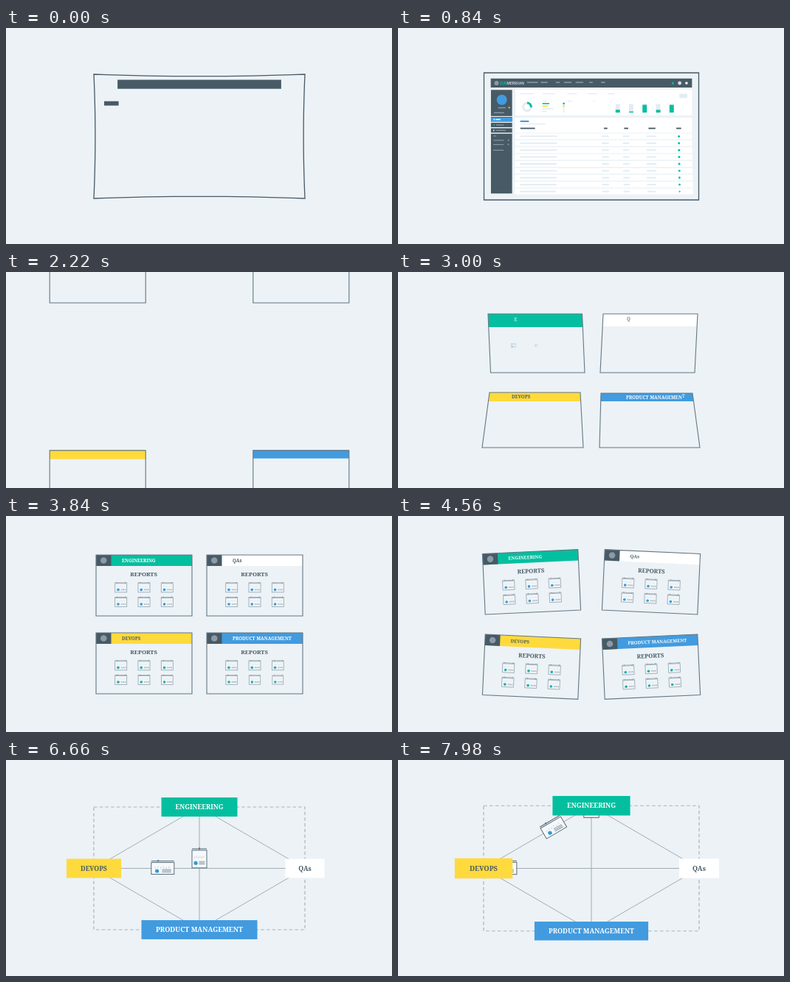
Write an HTML page with a canvas that moves like this. It is 523 px wide and 294 px high and loops after 8000 ms.

```html
<!DOCTYPE html>
<html lang="en">
<head>
<meta charset="utf-8">
<title>Reports for every team</title>
<style>
  html, body { margin: 0; width: 100%; height: 100%; overflow: hidden; background: #ecf2f6; }
  canvas { display: block; width: 100%; height: 100%; }
</style>
</head>
<body>
<canvas id="stage"></canvas>
<script>
const W = 523, H = 294, LOOP = 8000, STEP = 60, CX = 262, CY = 147.5;
const BG = '#ecf2f6', DARK = '#475a66', GREEN = '#04bf9f', YELLOW = '#ffda3d',
      BLUE = '#429bdf', PALE = '#e3ecf2', WHITE = '#ffffff', GREY = '#9aa6ae';
const canvas = document.getElementById('stage'), ctx = canvas.getContext('2d');

const lerp = (a, b, u) => a + (b - a) * u;
const clamp = u => Math.max(0, Math.min(1, u));
const seg = (t, from, to) => clamp((t - from) / (to - from));
const smooth = u => (1 - Math.cos(Math.PI * u)) / 2;
const easeOut = u => 1 - (1 - u) ** 3;
const ramp = (t, from, to) => smooth(seg(t, from, to));
const serif = size => `700 ${size}px "Noto Serif", serif`;

function poly(points, fill, stroke, width = 1.3) {
  ctx.beginPath();
  points.forEach(p => ctx.lineTo(p[0], p[1]));
  ctx.closePath();
  if (fill) { ctx.fillStyle = fill; ctx.fill(); }
  if (stroke) { ctx.strokeStyle = stroke; ctx.lineWidth = width; ctx.stroke(); }
}

function disc(x, y, r, color) {
  ctx.fillStyle = color;
  ctx.beginPath();
  ctx.arc(x, y, Math.max(0, r), 0, 7);
  ctx.fill();
}

function rect(x, y, w, h, color) {
  ctx.fillStyle = color;
  ctx.fillRect(x, y, w, h);
}

function line(x1, y1, x2, y2) {
  ctx.beginPath();
  ctx.moveTo(x1, y1);
  ctx.lineTo(x2, y2);
  ctx.stroke();
}

function placed(x, y, angle, scale, draw) {
  ctx.save();
  ctx.translate(x, y);
  ctx.rotate(angle);
  ctx.scale(scale, scale);
  draw();
  ctx.restore();
}

// Letters appear one by one; the newest one drops into place.
function typed(text, x, y, size, color, age) {
  const count = Math.min(text.length, Math.floor(age / 30));
  if (count < 1) return;
  const fresh = age < text.length * 30 + 30;
  const settled = text.slice(0, fresh ? count - 1 : count);
  ctx.font = serif(size);
  ctx.textAlign = 'left';
  ctx.textBaseline = 'alphabetic';
  ctx.fillStyle = color;
  ctx.fillText(settled, x, y + size * 0.36);
  if (fresh) {
    const width = ctx.measureText(settled).width, alpha = ctx.globalAlpha;
    ctx.globalAlpha = alpha * 0.75;
    ctx.fillText(text[count - 1], x + width, y + size * 0.36 - 1.5);
    ctx.globalAlpha = alpha;
  }
}

// ---- Dashboard: laid out in its tilted pose, remapped to the current pose ----
function drawDashboard(t) {
  const grow = ramp(t, 0, 840), tilt = ramp(t, 900, 1680), pinch = 2.7 * (1 - ramp(t, 0, 500));
  const half = lerp(lerp(143, 145.5, grow), 150, tilt);
  const top = lerp(lerp(63, 61, grow), 39, tilt);
  const height = lerp(lerp(169, 173, grow), 179, tilt);

  const project = (u, v) => [CX + u * (half + 7.5 * tilt * (1 - v)), top + v * height];
  const flat = (x, y) => {
    const v = (y - 39) / 179;
    return [(x - CX) / (157.5 - 7.5 * v), v];
  };
  const at = (x, y) => project(...flat(x, y));

  function bar(x1, y1, x2, y2, color, start = 300) {
    const g = easeOut(seg(t, start, start + 300)), mid = (y1 + y2) / 2;
    if (!g) return;
    const a = flat(x1, mid)[0], b = flat(x2, mid)[0], c = (a + b) / 2, d = (b - a) / 2 * g;
    const v1 = (y1 - 39) / 179, v2 = (y2 - 39) / 179;
    poly([project(c - d, v1), project(c + d, v1), project(c + d, v2), project(c - d, v2)], color);
  }
  const dot = (x, y, r, color, start = 400) =>
    disc(...at(x, y), r * easeOut(seg(t, start, start + 250)), color);
  const bars = (spans, y, h, color, start) =>
    spans.forEach(([a, b], i) => bar(a, y - h / 2, b, y + h / 2, color, start + i * 30));

  // The frame's sides sag inwards at first
  const edge = [];
  for (const [u0, v0, du, dv] of [[-1, 0, 2, 0], [1, 0, 0, 1], [1, 1, -2, 0], [-1, 1, 0, -1]])
    for (let i = 0; i < 16; i++) {
      const u = u0 + du * i / 16, v = v0 + dv * i / 16, [x, y] = project(u, v);
      edge.push([x - u * pinch * 2.8 * v * (1 - v), y + pinch * (1 - u * u) * (1 - 2 * v)]);
    }
  poly(edge, BG, DARK, 1.3);

  // Header
  bar(115, 47, 409, 59.8, DARK, -133);
  dot(123.5, 53.5, 3, '#8b9aa4', 250);
  if (t > 300) {
    const [x, y] = at(128, 53.6);
    ctx.font = '500 5px Roboto, sans-serif';
    ctx.textAlign = 'left';
    ctx.textBaseline = 'middle';
    ctx.fillStyle = GREEN;
    ctx.fillText('ZUN', x, y);
    const width = ctx.measureText('ZUN').width;
    ctx.fillStyle = '#d5dde2';
    ctx.fillText('MERIDIAN', x + width, y);
  }
  bars([[168, 184], [188, 198], [210, 216], [222, 233], [239, 250], [259, 264], [276, 282]], 52.5, 1.6, '#8b9aa4', 300);
  if (t > 400) {
    poly([at(379, 55), at(381, 51), at(383, 55)], GREEN);
    dot(391, 53.5, 2.4, '#d5dde2');
    dot(401, 53.5, 1.8, WHITE);
  }

  // Sidebar
  const open = easeOut(seg(t, 0, 360));
  const u1 = lerp(-0.902, -0.935, open), u2 = lerp(-0.765, -0.738, open);
  const v1 = lerp(0.217, 0.135, open), v2 = lerp(0.252, 0.95, open);
  poly([project(u1, v1), project(u2, v1), project(u2, v2), project(u1, v2)], DARK);
  dot(132, 77, 7, BLUE, 250);
  bar(127, 87.5, 138, 89, '#8b9aa4');
  dot(143, 88, 1.1, YELLOW);
  bar(121, 94.5, 136, 96, '#8b9aa4');
  bars([[116.5, 148.5]], 100.5, 1.2, BG, 300);
  bar(117.5, 102, 148, 107.3, BLUE, 350);
  bar(124, 104, 131, 105.5, WHITE, 400);
  for (let i = 0; i < 3; i++) {
    bars([[117, 148.5]], 108.6 + i * 7.7, 1.5, BG, 330);
    dot(122, 104.7 + i * 7.7, 0.9, [WHITE, GREEN, BG][i]);
    if (i) bars([[125, 133 + i * 3]], 104.7 + i * 7.7, 1.3, '#8b9aa4', 420);
  }
  bars([[122, 126]], 128, 1.2, '#8b9aa4', 420);
  for (const y of [134, 140, 148]) bars([[122, 137]], y, 1.2, '#8b9aa4', 440);
  dot(143.5, 134, 1, '#8b9aa4');
  dot(143.5, 140, 1, '#8b9aa4');

  // Summary panel
  bar(152, 62.5, 408, 99, WHITE, 120);
  bars([[158, 178], [191, 209], [227, 241], [257, 270], [286, 296]], 68.5, 1.4, PALE, 350);
  bar(390, 68.5, 401.5, 74.5, PALE, 400);
  bars([[191, 198], [227, 234], [264, 267]], 79, 1.3, PALE, 400);
  if (t > 350) {
    const [x, y] = at(169, 87), sweep = easeOut(seg(t, 350, 750));
    ctx.lineWidth = 3;
    for (const [color, part] of [[PALE, 1], [GREEN, 0.27]]) {
      ctx.strokeStyle = color;
      ctx.beginPath();
      ctx.arc(x, y, 5.3, -Math.PI / 2, -Math.PI / 2 + 2 * Math.PI * part * sweep);
      ctx.stroke();
    }
  }
  [[GREEN, 201], [YELLOW, 199], [PALE, 207], [PALE, 197]].forEach(([color, x], i) => {
    const y = 82.3 + i * 3.7;
    bars([[191, x]], y, 1.7, color, 400 + i * 50);
    dot(222, y, 1.4, color, 450 + i * 50);
  });
  [4, 1.5, 11, 4, 12].forEach((h, i) => {
    const x = 297 + i * 19.5, rise = h * easeOut(seg(t, 450 + i * 50, 800 + i * 50));
    bar(x, 83, x + 6.3, 95, PALE, 350);
    bar(x, 95 - rise, x + 6.3, 95, GREEN, 350);
  });

  // Table
  bar(152, 102, 407, 123.3, WHITE, 180);
  bar(159.5, 106.2, 172, 108.4, BLUE, 350);
  bar(159.5, 110.5, 196, 111.6, PALE, 380);
  bars([[160, 181], [280, 285], [309, 315], [344, 354], [384, 391]], 117.2, 1.9, DARK, 380);
  for (let i = 0; i < 9; i++) {
    const y = 128.4 + i * 9.72, start = 220 + i * 35, lean = i * 0.2;
    bar(152.7 + lean, y - 4.1, 406 - lean, y + 4.1, WHITE, start);
    bars([[160 + lean, 213], [277, 287], [307, 316], [341 - lean, 355 - lean]], y, 2, PALE, start + 120);
    dot(387.3 - lean, y, 1.5, GREEN, start + 250);
  }
}

// ---- Team cards ----
const makeCard = (name, color, ink, sx, sy, typeAt, headH, mid, home, box) => {
  const still = t => [t, CX + 75 * sx, CY + 53 * sy, 130, 83, 0, 0, 0];
  const tilted = t => [t, CX + 81 * sx, CY + 57.7 * sy, 129.5, 82.5, -0.046 * sx * sy, 0, 0];
  return {
    name, color, ink, typeAt, headH, home, box,
    keys: [
      [1950, CX + 130 * sx, CY + 210 * sy, 130, 83, 0, 0, 0],
      [2520, CX + 147 * sx, sy < 0 ? 75 : 198, 130, 83, 0, 0, 0],
      [3000, ...mid],
      still(3400), still(4200), tilted(4500), tilted(4700), still(5040),
      [5400, CX + 71 * sx, CY + 47.5 * sy, 135.5, 90 + 2 * sy, 0, 0, 0]
    ]
  };
};
// mid pose: x, y, width, height, rotation, taper, shear
const cards = [
  makeCard('ENGINEERING', GREEN, WHITE, -1, -1, 2945, 18, [187.5, 97, 127.5, 80, 0, 0, 3.5], [0, -83.5], [103, 26]),
  makeCard('QAs', WHITE, DARK, 1, -1, 2965, 17, [340, 97, 128, 80, 0, 0, -4], [143, 0], [53, 26]),
  makeCard('DEVOPS', YELLOW, DARK, -1, 1, 2500, 12, [184, 201.5, 130, 75, 0, 7, -3], [-143, 0], [74, 26]),
  makeCard('PRODUCT MANAGEMENT', BLUE, WHITE, 1, 1, 2460, 11, [339, 202, 130, 74, 0, 6, 4], [0, 83.5], [151, 25])
];
const LIFT_OFF = 5400;

function poseAt(keys, t) {
  if (t <= keys[0][0]) return keys[0].slice(1);
  for (let i = 1; i < keys.length; i++) {
    if (t > keys[i][0]) continue;
    const a = keys[i - 1], b = keys[i], u = ramp(t, a[0], b[0]);
    return a.map((n, k) => lerp(n, b[k], u)).slice(1);
  }
  return keys[keys.length - 1].slice(1);
}

function drawIcon(index) {
  rect(-8, -6, 16, 12, '#f0f5f8');
  ctx.strokeStyle = '#93a3ad';
  ctx.lineWidth = 0.8;
  ctx.strokeRect(-8, -6, 16, 12);
  line(-8.5, -7, 8.5, -7);
  disc(-5, -7.2, 0.7, '#8496a1');
  disc(6, -7.2, 0.7, '#8496a1');
  for (let i = 0; i < 5; i++) rect(-5.5 + i * 2.3, -2.5 + i % 2 * 0.7, 1.3, 0.7, '#d5dee4');
  disc(-3.8, 2.6, 1.8, index < 2 ? BLUE : '#2aa9b8');
  disc(-3, 2.2, 0.9, index < 2 ? '#2aa9b8' : GREEN);
  for (const x of [1, 3.4, 5.8]) disc(x, 2.5, 1.1, '#b4bfc7');
}

function drawCard(card, t, index) {
  const [x, y, w, h, rot, taper, shear] = poseAt(card.keys, t);
  const at = (px, py) => {
    const b = py / h, lx = px / w * (w + 2 * taper * b) + shear * b;
    return [x + lx * Math.cos(rot) - py * Math.sin(rot), y + lx * Math.sin(rot) + py * Math.cos(rot)];
  };
  const quad = (x1, y1, x2, y2, ...style) => poly([at(x1, y1), at(x2, y1), at(x2, y2), at(x1, y2)], ...style);
  const inset = 2.8 * ramp(t, 5040, LIFT_OFF);
  const headH = lerp(card.headH, 15, ramp(t, 3000, 3400));
  const left = -w / 2 + inset, top = -h / 2 + inset;

  ctx.globalAlpha = 1 - seg(t, 5480, 5700);
  quad(-w / 2, -h / 2, w / 2, h / 2, BG);
  if (t < LIFT_OFF) quad(left, top, w / 2 - inset, top + headH, card.color);
  const logo = 20.5 * (ramp(t, 3450, 3800) - ramp(t, 5040, 5340));
  if (logo > 0.3) {
    quad(left, top, left + logo, top + headH, DARK);
    disc(...at(left + logo / 2, top + headH / 2), logo * 0.21, '#8b9aa4');
  }
  quad(-w / 2, -h / 2, w / 2, h / 2, null, '#647783', 1.1);

  placed(x, y, rot, 1, () => {
    if (t < LIFT_OFF) typed(card.name, -30, top + headH / 2, 6.2, card.ink, t - card.typeAt);
    typed('REPORTS', -18.7, -14.9, 7.8, DARK, t - 3180 - index * 40);
    for (let i = 0; i < 6; i++) {
      const start = 2900 + index * 100 + i * 45, size = easeOut(seg(t, start, start + 700));
      if (size > 0) placed((i % 3 - 1) * 31.3, i < 3 ? 3.3 : 23, 0, size, () => drawIcon(index));
    }
  });
  ctx.globalAlpha = 1;
}

// ---- Diagram ----
const [ENG, QA, DEV, PROD] = [0, 1, 2, 3], TRIP = 930;
const trips = [
  [5750, DEV, PROD], [6150, PROD, ENG], [6300, DEV, QA], [6850, ENG, QA],
  [7000, PROD, DEV], [7605, ENG, DEV], [7790, DEV, QA], [7890, ENG, PROD]
];

function drawReport(w, h) {
  const l = -w / 2, t = -h / 2;
  rect(l, t, w, h, '#f5f9fb');
  ctx.strokeStyle = '#5b6e7a';
  ctx.lineWidth = 1;
  ctx.strokeRect(l, t, w, h);
  line(l, t - 2, l + w, t - 2);
  disc(w > h ? l + w * 0.3 : 0, t - 2.3, 1.2, '#5b6e7a');
  for (let i = 0; i < 6; i++)
    rect(l + w * (0.16 + i * 0.12), t + h * 0.32 + (i % 2 ? 0 : 1), 1, 2.4, '#c8d4da');
  const by = t + h * 0.72, bx = l + w * 0.25;
  disc(bx, by, 2.6, BLUE);
  disc(bx + 0.9, by + 0.8, 1.5, '#1f9fb0');
  for (let i = 0; i < 3; i++) rect(l + w * 0.47, by - 2.4 + i * 1.8, w * 0.4, 0.9, '#84939d');
}

function drawDiagram(t) {
  const shown = ramp(t, 5520, 5840), fly = ramp(t, LIFT_OFF, 5840);
  placed(CX, CY, 0, 1 + 0.021 * ramp(t, 6660, 7500), () => {
    ctx.globalAlpha = shown;
    ctx.strokeStyle = '#aab5bc';
    ctx.lineWidth = 1.2;
    ctx.setLineDash([4.5, 3.2]);
    ctx.strokeRect(-143, -83.5, 286, 167);
    ctx.setLineDash([]);
    ctx.strokeStyle = GREY;
    ctx.lineWidth = 0.9;
    line(0, -83.5, 0, 83.5);
    line(-143, 0, 143, 0);
    ctx.beginPath();
    for (const i of [ENG, QA, PROD, DEV]) ctx.lineTo(...cards[i].home);
    ctx.closePath();
    ctx.stroke();

    for (const [start, from, to] of trips) {
      const u = smooth(seg(t, start, start + TRIP));
      if (u <= 0 || u > 0.96) continue;
      const [ax, ay] = cards[from].home, [bx, by] = cards[to].home;
      const upright = ax === bx, angle = upright ? 0 : Math.atan((by - ay) / (bx - ax));
      placed(lerp(ax, bx, u), lerp(ay, by, u), angle, 1,
        () => upright ? drawReport(20, 24) : drawReport(31, 16));
    }
    ctx.globalAlpha = 1;

    cards.forEach((card, i) => {
      const [x, y, , h] = poseAt(card.keys, t);
      let swell = 1;
      for (const [start, , to] of trips)
        if (to === i) swell += 0.04 * Math.sin(Math.PI * seg(t, start + TRIP - 200, start + TRIP + 200));
      const bw = lerp(130, card.box[0], fly), bh = lerp(15, card.box[1], fly);
      const size = lerp(6.2, 8.8, fly);
      const px = lerp(x - CX, card.home[0], fly);
      const py = lerp(y - CY - h / 2 + 10.3, card.home[1], fly);
      placed(px, py, 0, swell, () => {
        rect(-bw / 2, -bh / 2, bw, bh, card.color);
        ctx.font = serif(size);
        const half = ctx.measureText(card.name).width / 2;
        typed(card.name, lerp(-30, -half, fly), 0, size, card.ink, LOOP);
      });
    });
  });
}

function draw(t) {
  ctx.setTransform(canvas.width / W, 0, 0, canvas.height / H, 0, 0);
  rect(0, 0, W, H, BG);
  if (t < 2100) {
    const shrink = 1 - seg(t, 1680, 2100) ** 2;
    ctx.save();
    ctx.translate(CX, lerp(CY, 128, shrink));
    ctx.scale(shrink, shrink);
    ctx.translate(-CX, -128);
    drawDashboard(t);
    ctx.restore();
  }
  if (t > 1950 && t < 5700) cards.forEach((card, i) => drawCard(card, t, i));
  if (t >= LIFT_OFF) drawDiagram(t);
}

const begin = performance.now();
function frame() {
  const ratio = window.devicePixelRatio || 1;
  const w = Math.round(innerWidth * ratio), h = Math.round(innerHeight * ratio);
  if (canvas.width !== w || canvas.height !== h) { canvas.width = w; canvas.height = h; }
  const t = (performance.now() - begin) % LOOP;
  draw(Math.floor(t / STEP) * STEP);
  requestAnimationFrame(frame);
}
frame();
</script>
</body>
</html>
```
